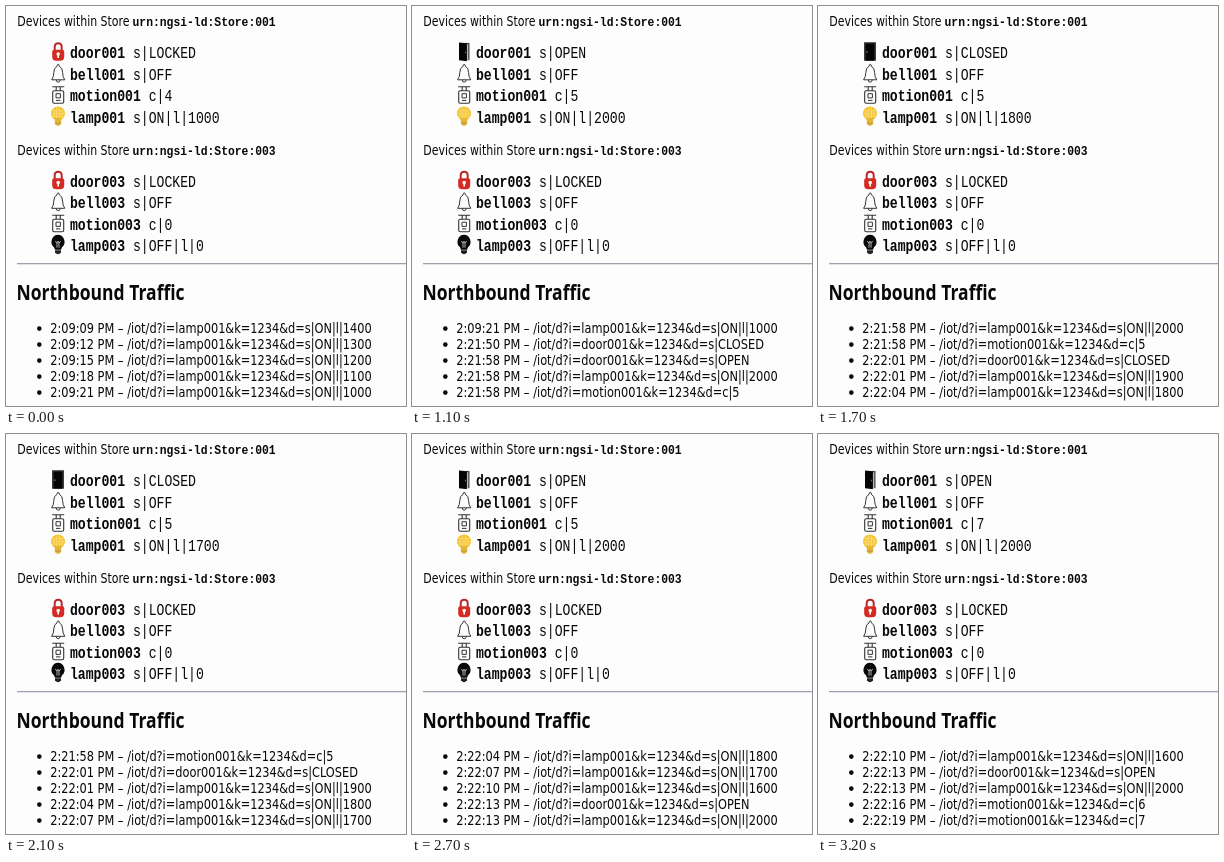
An HTML page with a canvas that plays this animation: 400x400 px, repeating every 3.3 s.

```html
<!DOCTYPE html>
<html lang="en">
<head>
<meta charset="utf-8">
<title>Device monitor</title>
<style>
html, body { margin: 0; width: 100%; height: 100%; overflow: hidden; background: #fdfdfd; }
canvas { display: block; width: 400px; height: 400px; }
</style>
</head>
<body>
<canvas id="stage"></canvas>
<script>
const LOOP = 3300;
const SQUASH = 0.83; // the whole page is narrowed evenly
const PAPER = '#fdfdfd', INK = '#080808';
const SANS = '"DejaVu Sans", sans-serif';
const HEAD = '"Open Sans", sans-serif';
const MONO = '"Liberation Mono", monospace';

// [time shown, clock, device, message]
const LOG = [
  [0, '2:09:09', 'lamp', 's|ON|l|1400'],
  [0, '2:09:12', 'lamp', 's|ON|l|1300'],
  [0, '2:09:15', 'lamp', 's|ON|l|1200'],
  [0, '2:09:18', 'lamp', 's|ON|l|1100'],
  [0, '2:09:21', 'lamp', 's|ON|l|1000'],
  [400, '2:21:50', 'door', 's|CLOSED'],
  [1100, '2:21:58', 'door', 's|OPEN'],
  [1100, '2:21:58', 'lamp', 's|ON|l|2000'],
  [1100, '2:21:58', 'motion', 'c|5'],
  [1400, '2:22:01', 'door', 's|CLOSED'],
  [1400, '2:22:01', 'lamp', 's|ON|l|1900'],
  [1700, '2:22:04', 'lamp', 's|ON|l|1800'],
  [2000, '2:22:07', 'lamp', 's|ON|l|1700'],
  [2300, '2:22:10', 'lamp', 's|ON|l|1600'],
  [2600, '2:22:13', 'door', 's|OPEN'],
  [2600, '2:22:13', 'lamp', 's|ON|l|2000'],
  [2900, '2:22:16', 'motion', 'c|6'],
  [3200, '2:22:19', 'motion', 'c|7']
];

const canvas = document.getElementById('stage');
const dpr = window.devicePixelRatio || 1;
canvas.width = canvas.height = 400 * dpr;
const ctx = canvas.getContext('2d');

function text(str, x, y, font) {
  ctx.save();
  ctx.translate(x, y);
  ctx.scale(SQUASH, 1);
  ctx.font = font;
  ctx.fillStyle = INK;
  ctx.fillText(str, 0, 0);
  const w = ctx.measureText(str).width * SQUASH;
  ctx.restore();
  return x + w;
}

function disc(x, y, r, color) {
  ctx.fillStyle = color;
  ctx.beginPath();
  ctx.arc(x, y, r, 0, Math.PI * 2);
  ctx.fill();
}

function box(x, y, w, h, color) {
  ctx.fillStyle = color;
  ctx.fillRect(x, y, w, h);
}

function path(d, fill, stroke, width = 1) {
  const p = new Path2D(d);
  if (fill) { ctx.fillStyle = fill; ctx.fill(p); }
  if (stroke) { ctx.strokeStyle = stroke; ctx.lineWidth = width; ctx.stroke(p); }
}

// Icons sit in a cell about 14 wide and 20 high.
const icons = {
  LOCKED() {
    path('M3.7 10V5.2Q3.7 1.6 7.2 1.6Q10.7 1.6 10.7 5.2V10', null, '#b8282a', 2);
    path('M1.2 10Q1.2 8 3.2 8H11.2Q13.2 8 13.2 10V15Q13.2 19 9.2 19H5.2Q1.2 19 1.2 15Z', '#d42a22');
    disc(7.2, 12.3, 1.8, PAPER);
    box(6.4, 12.5, 1.6, 3.8, PAPER);
  },
  CLOSED() {
    box(1, .5, 12, 18.5, '#3c3c3c');
    box(2.5, 1.8, 9, 17.2, '#050505');
    box(3.2, 9.8, 1.3, 1.3, '#8a8a8a');
  },
  OPEN() {
    box(8.5, 1.2, 4, 17.3, '#4a4a4a');
    box(9.8, 2.6, 1.4, 15.9, '#b8b8b8');
    path('M2 .7L9.8 1.6V19.5L2 18.5Z', '#050505');
    box(8, 10, .9, 1.6, '#8a8a8a');
  },
  bell() {
    path('M6 3.2Q6 1.2 7.2 1.2Q8.4 1.2 8.4 3.2Q11.6 4.4 11.6 9.4Q11.6 13.8 13.8 16.6H.6Q2.8 13.8 2.8 9.4Q2.8 4.4 6 3.2Z',
      null, '#333', 1);
    path('M5.2 16.8Q5.4 19 7.2 19Q9 19 9.2 16.8', null, '#333', 1);
  },
  motion() {
    path('M1.2 2H13.2M5.2 2V6M9.2 2V6', null, '#333', 1.1);
    path('M3.2 6H11.2Q12.7 6 12.7 7.5V17Q12.7 18.5 11.2 18.5H3.2Q1.7 18.5 1.7 17V7.5Q1.7 6 3.2 6Z',
      null, '#333', 1.1);
    path('M5 9H9.4V13.2H5Z', null, '#333', 1);
    box(5, 15.2, 4.4, 1, '#333');
  },
  on() {
    disc(7, 7.2, 7, '#f4c42c');
    path('M3 3.5V11M5.7 1.2V13M8.4 1.2V13M11.1 3.5V11M2 4.5H12M.8 7.2H13.2M2 9.9H12', null, '#fbe59a', .6);
    path('M3.5 12H10.5L10 18Q8.5 19.7 7 19.7Q5.5 19.7 4 18Z', '#e3b638');
    box(4, 16.5, 6, .8, '#b08f3c');
  },
  off() {
    path('M7 0A6.5 7 0 0 1 11 12.5L10 15H4L3 12.5A6.5 7 0 0 1 7 0Z', INK);
    path('M4.3 6.3L6 8.5L7 6.5L8 8.5L9.7 6.3M6 8.5V13M8 8.5V13', null, '#d8d8d8', .8);
    path('M4 15.6H10V17.5Q8.5 19.5 7 19.5Q5.5 19.5 4 17.5Z', '#222');
  }
};

function icon(name, x, y) {
  ctx.save();
  ctx.translate(x, y);
  icons[name]();
  ctx.restore();
}

function store(id, top, state) {
  text('Devices within Store', 11.3, top + 20, '13.2px ' + SANS);
  text('urn:ngsi-ld:Store:' + id, 126.5, top + 20, 'bold 13.7px ' + MONO);
  const rows = [
    ['door', state.door, state.door.slice(2)],
    ['bell', 's|OFF', 'bell'],
    ['motion', state.motion, 'motion'],
    ['lamp', state.lamp, state.lamp.includes('ON') ? 'on' : 'off']
  ];
  rows.forEach(([name, value, pic], i) => {
    const y = top + 52 + i * 21.5;
    icon(pic, 45, y - 16.3);
    const x = text(name + id, 64, y, 'bold 15.8px ' + MONO);
    text(' ' + value, x, y, '15.8px ' + MONO);
  });
}

function draw(t) {
  ctx.setTransform(dpr, 0, 0, dpr, 0, 0);
  box(0, 0, 400, 400, PAPER);

  const seen = LOG.filter(e => e[0] <= t);
  const state = { door: 's|LOCKED', motion: 'c|4', lamp: '' };
  for (const [, , name, msg] of seen) state[name] = msg;

  store('001', 0, state);
  store('003', 128.5, { door: 's|LOCKED', motion: 'c|0', lamp: 's|OFF|l|0' });

  box(11, 257, 389, 1, '#a0a0ac');
  box(11, 258, 389, 1, '#e2e2e8');
  text('Northbound Traffic', 10.5, 294, 'bold 21.1px ' + HEAD);

  seen.slice(-5).forEach(([, clock, name, msg], i) => {
    const y = 326.8 + i * 16;
    disc(33.3, y - 4.2, 2.3, INK);
    text(`${clock} PM – /iot/d?i=${name}001&k=1234&d=${msg}`, 44.2, y, '13.7px ' + SANS);
  });
}

const start = performance.now();
function tick() {
  draw((performance.now() - start) % LOOP);
  requestAnimationFrame(tick);
}
tick();
</script>
</body>
</html>
```
